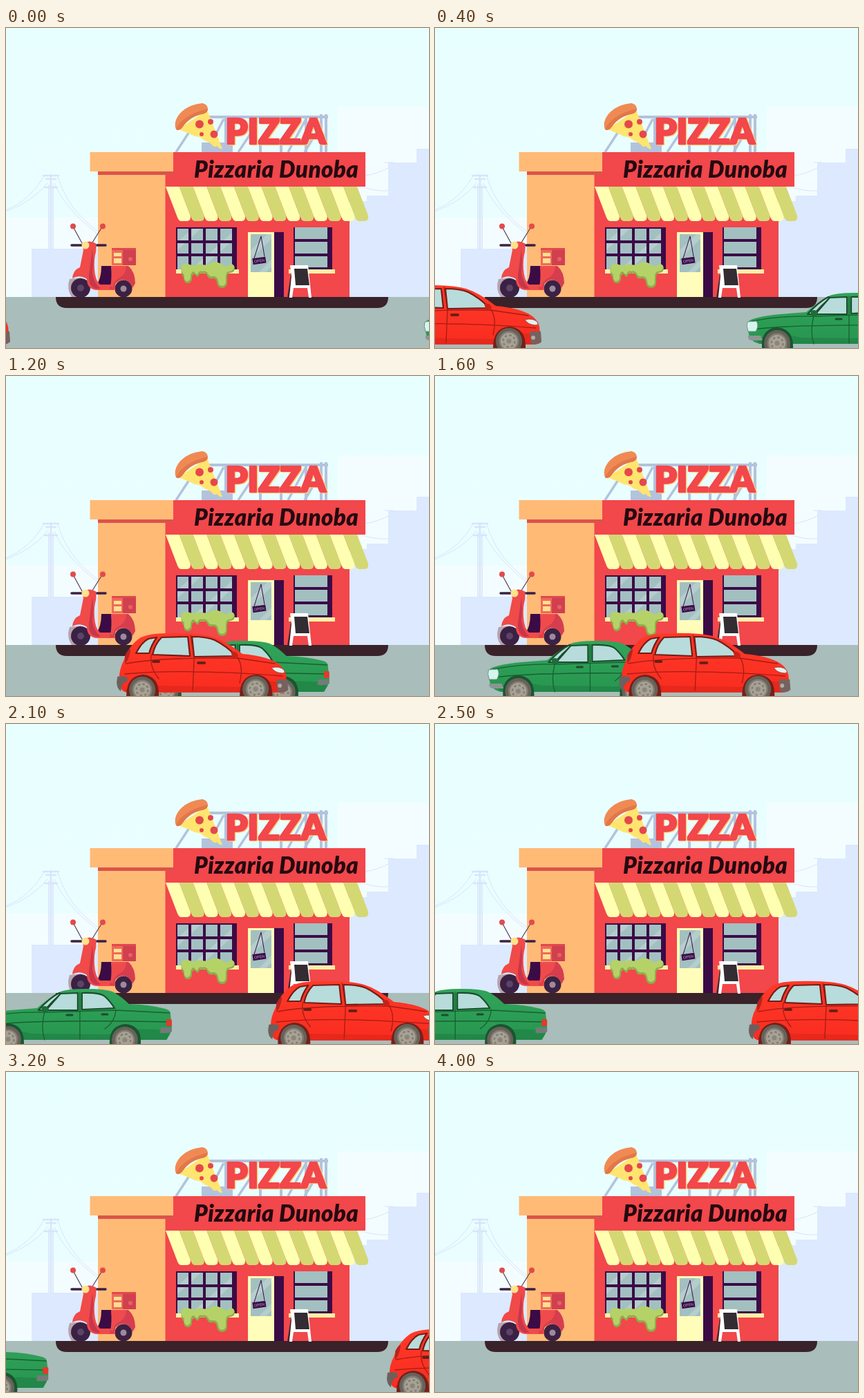
An HTML page that plays this animation: 612 px wide and 464 px high, repeating every 5000 ms.

```html
<!DOCTYPE html>
<html lang="en">
<head>
<meta charset="utf-8">
<title>Pizza shop</title>
<style>
  html, body { margin: 0; width: 100%; height: 100%; overflow: hidden; background: #e9feff; }
  svg { display: block; width: 612px; height: 464px; }
  .glass { fill: #a3c0c1; }
  .frame { fill: #3b0b46; }
  .cream { fill: #fffdb9; }
  .red { fill: #f2474b; }
  .far { fill: #dce9fe; }
  .sign { font-family: Lato, "Open Sans", sans-serif; font-weight: 900; }
  .line { fill: none; stroke-linecap: round; stroke-linejoin: round; }
  .pane { fill: #b7dcdb; stroke-width: 2.2; stroke-linejoin: round; }
</style>
</head>
<body>
<svg viewBox="0 0 612 464">
  <defs>
    <linearGradient id="sky" x1="0" y1="0" x2="0" y2="1">
      <stop offset="0" stop-color="#e8ffff"/>
      <stop offset="1" stop-color="#ecfdff"/>
    </linearGradient>
    <linearGradient id="redPaint" x1="0" y1="0" x2="0" y2="1">
      <stop offset="0" stop-color="#ff3a29"/>
      <stop offset="1" stop-color="#f92c1f"/>
    </linearGradient>
    <linearGradient id="greenPaint" x1="0" y1="0" x2="0" y2="1">
      <stop offset="0" stop-color="#31a45a"/>
      <stop offset="1" stop-color="#279650"/>
    </linearGradient>
    <g id="wheel">
      <circle r="19" fill="#67625a"/>
      <circle r="14.500" fill="#837e73"/>
      <circle r="12" fill="#a7a295"/>
      <circle r="8.500" fill="none" stroke="#827d72" stroke-width="2.500" stroke-dasharray="3.500 3.175"/>
      <circle r="3.500" fill="#8b867a"/>
    </g>
    <clipPath id="leftGlass"><path d="M246 289H328V350H246Z"/></clipPath>
    <clipPath id="doorGlass"><path d="M354 299H384V354H354Z"/></clipPath>
  </defs>

  <!-- background -->
  <rect width="612" height="464" fill="url(#sky)"/>
  <path d="M480 115H612V390H480ZM0 275H135V390H0Z" fill="#f3fdff"/>
  <path class="far" d="M37 320H134V390H37ZM497 390V251H522V243H553V195H594V175H612V390Z"/>
  <g class="line" stroke="#d8e4fb">
    <path d="M65 213V320M54 214H76M58 219H72M56 231H74" stroke-width="2.500"/>
    <path d="M62 228V320M68 228V320" stroke-width="1.500"/>
    <path d="M55 215Q35 250 0 264M60 225Q38 252 0 266M75 215Q88 262 134 296M70 225Q85 262 134 300" stroke-width="1"/>
    <path d="M520 214Q535 212 553 203M520 232Q536 237 553 236M548 195H560" stroke-width="1"/>
  </g>
  <rect y="390" width="612" height="74" fill="#a9bdbb"/>

  <!-- roof sign -->
  <g class="line" stroke="#b3c3dc" stroke-width="4" style="stroke-linecap:butt">
    <path d="M285 129H466M463 125V180M456 125V180M434 127V180M318 127V180M398 165V180M368 165V180"/>
    <path d="M272 140L246 180M315 132L290 180M434 132L408 180M456 140L432 180M356 150L336 180" stroke-width="3.500"/>
  </g>
  <path d="M283 166H328V180H283Z" fill="#b3c3dc"/>
  <g class="sign" font-size="50.500" stroke-width="2.600" stroke-linejoin="round">
    <text x="319" y="168.500" fill="#ffcf7c" stroke="#ffcf7c">PIZZA</text>
    <text x="317.500" y="168" fill="#f2474b" stroke="#f2474b">PIZZA</text>
  </g>
  <path d="M249 147L291 119L313 175Q309 176 305 171Q301 174 298 169Q293 165 287 163Q281 157 273 157Q262 151 249 147Z" fill="#ffe56f"/>
  <path d="M246 147Q242 137 250 126Q262 111 284 109Q291 110 292 117Q292 122 287 124Q266 128 256 143Q251 150 246 147Z" fill="#f08a54"/>
  <path d="M246 147Q255 126 292 117Q292 122 287 124Q266 128 256 143Q251 150 246 147Z" fill="#e2774a"/>
  <g fill="#e5484b">
    <circle cx="280" cy="139.500" r="6"/><circle cx="296" cy="136" r="4"/>
    <circle cx="301" cy="154" r="5.500"/><circle cx="283" cy="154" r="3"/>
  </g>

  <!-- building -->
  <rect x="133" y="208" width="99" height="182" fill="#ffba76"/>
  <path class="red" d="M230.500 208H497V390H230.500Z"/>
  <rect x="133" y="208" width="110" height="5" fill="#db534b"/>
  <rect x="121.500" y="180" width="121" height="28" fill="#ffba76"/>
  <rect class="red" x="242" y="180" width="278" height="50"/>
  <text class="sign" x="272" y="217" font-size="33" letter-spacing=".4" font-style="italic" fill="#240a10">Pizzaria Dunoba</text>
  <g id="awning"></g>

  <!-- windows -->
  <rect class="glass" x="246" y="289" width="88" height="62"/>
  <path clip-path="url(#leftGlass)" d="M246 312L272 289H284L246 324ZM268 350L328 296V308L282 350Z" fill="#b5cdcd"/>
  <path class="frame" d="M327 289H334V351H327ZM264 289H268V351H264ZM285 289H289V351H285ZM306 289H310V351H306ZM246 308H330V312H246ZM246 327H330V331H246ZM246 289H328V291H246ZM246 289H248V351H246Z"/>
  <rect x="246" y="350" width="91" height="6" fill="#fff0a6"/>
  <path d="M254 346Q258 341 266 344Q273 347 281 343Q290 347 298 341Q306 338 313 344Q319 349 323 344Q330 341 331 348Q331 355 324 355Q320 356 320 362V370Q319 377 313 377Q306 377 305 369Q304 362 299 363Q293 365 291 359Q289 354 284 356Q280 354 279 359Q277 363 274 358Q271 355 269 361V365Q267 371 262 370Q257 369 257 362Q252 356 254 346Z" fill="#8fab4b"/>
  <path d="M254 345Q258 340 266 343Q273 346 281 342Q290 346 298 340Q306 338 313 343Q319 348 323 343Q330 341 330 347Q329 353 322 353Q318 354 318 361V369Q317 374 312 374Q307 373 307 366Q305 359 299 360Q294 361 292 356Q289 351 284 353Q279 351 278 356Q275 359 273 354Q269 351 267 359V363Q265 368 261 367Q257 365 258 358Q252 353 254 345Z" fill="#b5d268"/>
  <rect class="glass" x="417" y="289" width="55" height="61"/>
  <path class="frame" d="M465 289H472V350H465ZM417 306H468V310H417ZM417 327H468V331H417ZM416 289H418V350H416ZM416 347H466V350H416Z"/>
  <rect x="409" y="350" width="67" height="6" fill="#fff0a6"/>

  <!-- door -->
  <rect class="frame" x="386" y="296" width="16" height="94"/>
  <rect class="cream" x="350" y="296" width="38" height="94"/>
  <rect class="glass" x="354" y="299" width="30" height="55"/>
  <path clip-path="url(#doorGlass)" d="M354 322L378 299H384V306L354 335ZM366 354L384 336V346L376 354Z" fill="#b5cdcd"/>
  <path class="line" d="M359 334L369 302L374 331" stroke="#3b0b46" stroke-width="1"/>
  <g transform="rotate(-8 366 338)">
    <rect class="frame" x="357" y="333" width="19" height="9"/>
    <text x="366.500" y="339.700" font-family="Lato, sans-serif" font-size="5.500" font-weight="700" text-anchor="middle" fill="#9d84ad">OPEN</text>
  </g>

  <!-- pavement board -->
  <path d="M72 390H553Q553 406 537 406H88Q72 406 72 390Z" fill="#392229"/>
  <path class="line" d="M415 347L408.500 389" stroke="#3a2930" stroke-width="2.500"/>
  <path d="M411 344H437L442 391H438L436 377H416L414 391H410L413 360Z" fill="#fff"/>
  <path d="M417 349H436L439 373H419Z" fill="#332c32"/>

  <!-- scooter -->
  <g>
    <path d="M92 364Q87 378 95 390H109V362Z" fill="#b6a4ae"/>
    <circle cx="108" cy="377" r="14" fill="#3b2144"/>
    <circle cx="108" cy="377" r="5" fill="#5b4468"/>
    <circle cx="170" cy="378" r="12.500" fill="#3b2144"/>
    <circle cx="170" cy="378" r="4.500" fill="#9d8a9c"/>
    <path class="line" d="M110 312L98 290M125 311L138 290" stroke="#5d4860" stroke-width="1.300"/>
    <circle cx="97" cy="287.500" r="4" fill="#e24a4d"/>
    <circle cx="140" cy="287.500" r="4" fill="#e24a4d"/>
    <path class="frame" d="M138 345H155V374H130Q138 364 138 345Z"/>
    <path d="M110 313Q121 306 131 313L130 325Q127 335 128 350Q129 366 136 372H158V380H130Q117 378 117 364Q106 357 96 363Q97 351 107 347L112 322Z" fill="#f04a49"/>
    <path d="M125 321Q127 338 125 355Q127 370 137 378H130Q119 375 120 358Z" fill="#c8364c"/>
    <path d="M152 345H177Q187 354 187 370L183 377Q179 365 168 365Q157 367 156 379H150Q154 364 152 345Z" fill="#d63e4f"/>
    <path d="M152 345H174Q174 357 163 363Q155 367 155 376L151 375Q154 362 152 345Z" fill="#ef4b4c"/>
    <path class="line" d="M95 315H109M132 315H144" stroke="#3b2144" stroke-width="3.500"/>
    <circle cx="115" cy="315" r="5.500" fill="#ffe28b"/>
    <rect x="168" y="319" width="20" height="25" fill="#d0404f"/>
    <rect x="153" y="321" width="16" height="23" fill="#ef6a59"/>
    <path d="M153 319H188V322H153Z" fill="#e2484c"/>
    <path d="M156 326H167V331H156ZM156 334H167V341H156Z" fill="#ffdf91"/>
    <circle cx="180" cy="335" r="3" fill="#e86067"/>
  </g>

  <!-- green car -->
  <g id="green">
    <path d="M4 448L2 440Q-1 430 4 424Q16 418 48 415L86 412Q105 396 118 389Q128 384 156 384Q187 384 197 389Q209 396 219 406Q250 407 272 413Q279 415 279 420L281 440Q280 451 272 458H20Q8 456 4 448Z" fill="url(#greenPaint)"/>
    <path d="M15 452Q40 438 78 449L190 450Q220 438 279 445L274 458H18Z" fill="#208044" opacity=".65"/>
    <path class="pane" d="M88 415Q104 397 118 390L121 391Q108 402 97 415Z" stroke="#1a4d2c"/>
    <path class="pane" d="M99 415L120 391L145 390V415Z" stroke="#1a4d2c"/>
    <path class="pane" d="M151 390Q177 389 184 395Q192 402 198 412L151 414Z" stroke="#1a4d2c"/>
    <g class="line" stroke="#17602f" stroke-width="1.300">
      <path d="M97 417Q91 440 97 458M148 389V457M200 414Q199 432 184 442M8 425Q50 417 97 418L200 415L278 419M10 437Q80 428 278 432"/>
    </g>
    <path class="line" d="M129 422H137M180 421H188" stroke="#204a30" stroke-width="3"/>
    <path d="M92 411Q99 406 103 413L101 418H94Z" fill="#1d6d3a"/>
    <path d="M1 426L14 425Q18 432 13 440L2 440Q-1 432 1 426Z" fill="#d9f4ef" stroke="#5e9b84"/>
    <path d="M2 446H20L23 453H7Q1 452 2 446Z" fill="#8b9691"/>
    <rect x="273" y="428" width="8" height="10" rx="1.500" fill="#e03a2d"/>
    <path d="M265 440H281V446Q278 449 264 448Z" fill="#747b77"/>
    <path d="M22 464Q20 436 44 434Q68 436 67 464ZM191 464Q190 437 214 435Q238 437 236 464Z" fill="#19552f"/>
    <use href="#wheel" x="44" y="457"/>
    <use href="#wheel" x="213" y="458"/>
  </g>

  <!-- red car -->
  <g id="red">
    <path d="M4 447Q2 428 10 413Q17 391 35 379Q48 373 72 373Q118 372 139 378Q158 384 182 403Q216 406 232 416Q242 422 245 433L247 454Q245 459 236 459H16Q6 458 4 447Z" fill="url(#redPaint)"/>
    <path d="M12 455Q40 438 58 449L180 451Q204 436 245 446L244 458H14Z" fill="#d9251b" opacity=".6"/>
    <path class="pane" d="M28 402Q36 386 46 381L58 379Q50 390 47 402Z" stroke="#761b15"/>
    <path class="pane" d="M52 404Q55 389 65 379L103 378L106 406Z" stroke="#761b15"/>
    <path class="pane" d="M109 378Q130 378 142 383Q158 391 173 406L112 407Z" stroke="#761b15"/>
    <g class="line" stroke="#a51c15" stroke-width="1.300">
      <path d="M107 376L112 410L110 456M50 404Q47 422 61 439M174 407Q184 420 178 445M14 417Q60 408 174 409L229 417M12 432Q100 424 240 435"/>
    </g>
    <path class="line" d="M53 414H61M118 416H127" stroke="#682018" stroke-width="4"/>
    <path d="M165 400Q174 398 176 406L168 409Z" fill="#ca2119"/>
    <path d="M12 405Q17 395 20 396Q19 409 12 418Z" fill="#b72420"/>
    <path d="M224 423Q235 420 242 426Q245 431 239 431Q228 430 224 423Z" fill="#e6f0ed" stroke="#a63e37"/>
    <path d="M1 436Q8 434 16 437L15 443Q7 444 6 457Q0 453 0 444Z" fill="#6c605e"/>
    <path d="M231 440H247L248 455Q245 459 233 458Z" fill="#75625f"/>
    <circle cx="236" cy="449" r="3" fill="#b3aaa2"/>
    <path d="M14 464Q14 435 38 433Q62 435 61 464ZM178 464Q178 434 202 433Q226 435 225 464Z" fill="#752019"/>
    <use href="#wheel" x="37" y="455"/>
    <use href="#wheel" x="201" y="454"/>
  </g>
</svg>
<script>
  const $ = id => document.getElementById(id);

  // slanted awning stripes with round lower ends
  const stripes = 14, w = 277 / stripes;
  let art = '';
  for (let i = 0; i < stripes; i++) {
    const x = 231 + i * w, low = x + 16;
    art += `<path d="M${x} 230H${x + w}L${low + w} 272Q${low + w + 1} 280 ${low + w - 5} 280H${low + 6}Q${low + 2} 279 ${low} 272Z" fill="${i % 2 ? '#d4d873' : '#ffffb2'}"/>`;
  }
  $('awning').innerHTML = art;

  const loop = 5000, step = 100, rest = 4000;
  const cars = [
    { el: $('red'), from: -242, rate: 1 },
    { el: $('green'), from: 605, rate: -1.04 }
  ];
  // steady braking: speed falls evenly with time
  const travel = t => t * (0.3875 - 0.00004365 * t);

  function draw() {
    const t = Math.floor(performance.now() % loop / step) * step;
    for (const { el, from, rate } of cars) {
      el.setAttribute('transform', `translate(${from + rate * travel(t)} 0)`);
      el.setAttribute('visibility', t < rest ? 'visible' : 'hidden');
    }
    requestAnimationFrame(draw);
  }
  draw();
</script>
</body>
</html>
```
